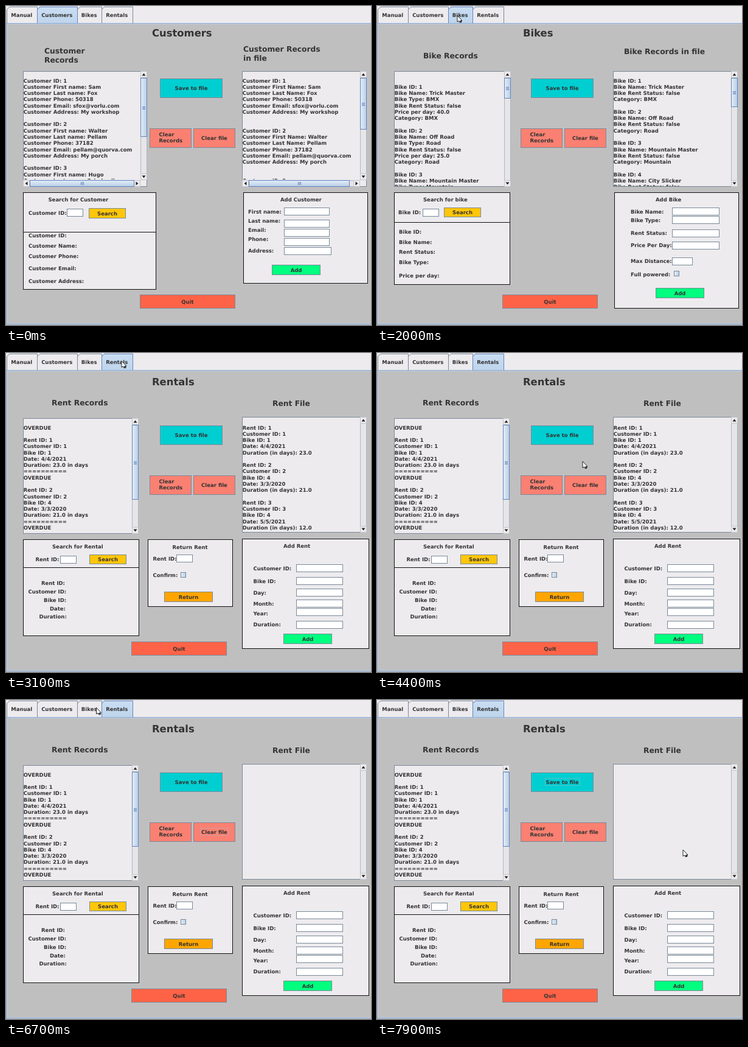
Recreate the animation shown at these times as an HTML page. Size 600 by 524 pixels, loop 8 s.

```html
<!DOCTYPE html>
<html lang="en">
<head>
<meta charset="utf-8">
<title>Bike rental manager</title>
<style>
html, body { margin: 0; width: 100%; height: 100%; overflow: hidden; background: #c0bfc0; }
#stage { display: block; }
text { font: bold 8.5px "DejaVu Sans", sans-serif; fill: #333; white-space: pre; text-rendering: geometricPrecision; }
.title { font-size: 16.4px; }
.head { font-size: 12.3px; }
.mid { text-anchor: middle; }
</style>
</head>
<body>
<svg id="stage" width="600" height="524" viewBox="0 0 600 524"></svg>
<script>
const PANEL = '#edebee', EDGE = '#7a8a99', BLUE = '#6382bf';

// All boxes are given by their left, top, right and bottom edges.
const box = (l, t, r, b, fill, stroke = EDGE) =>
  `<rect x="${l + .5}" y="${t + .5}" width="${r - l - 1}" height="${b - t - 1}" fill="${fill}" stroke="${stroke}"/>`;
const path = (d, fill, stroke = 'none') => `<path d="${d}" fill="${fill}" stroke="${stroke}"/>`;
const text = (s, x, y, cls = '') => `<text x="${x}" y="${y}" class="${cls}">${s}</text>`;
const title = s => text(s, 240, s === 'Rentals' ? 53 : 50, 'title');
const head = (s, x, y) => text(s, x, y, 'head');
const field = (l, t, r, b = t + 13) => box(l, t, r, b, '#fff');
const check = (l, t) => box(l, t, l + 9, t + 9, 'url(#thumb)');
const panel = (l, t, r, b, split) =>
  box(l, t, r, b, PANEL, '#111') + (split ? path(`M${l} ${split + .5}H${r}`, 'none', '#111') : '');
const labels = (x, list) => list.map(([s, y]) => text(s, x, y)).join('');

function button(s, l, t, r, b, fill) {
  return box(l, t, r, b, fill) + text(s, (l + r) / 2, (t + b) / 2 + 3.2, 'mid');
}

function arrow(l, t, dir) {
  const shape = {
    up: 'M-3 2L0 -2L3 2Z', down: 'M-3 -2L0 2L3 -2Z',
    left: 'M2 -3L-2 0L2 3Z', right: 'M-2 -3L2 0L-2 3Z'
  }[dir];
  return box(l, t, l + 11, t + 11, PANEL, '#c3c6ca') +
    `<g transform="translate(${l + 5.5} ${t + 5.5})">${path(shape, '#222')}</g>`;
}

function scrollY(l, t, b, end) {
  let s = box(l, t, l + 11, b, '#e6e5e8', '#b0b6bd') + arrow(l, t, 'up') + arrow(l, b - 11, 'down');
  if (end) {
    const m = Math.round((t + 11 + end) / 2);
    s += box(l, t + 11, l + 11, end, 'url(#thumb)', BLUE) +
      path(`M${l + 3} ${m - 1.5}h5m-5 2h5m-5 2h5`, 'none', BLUE);
  }
  return s;
}

function scrollX(l, t, r, end) {
  const m = Math.round((l + 11 + end) / 2);
  return box(l, t, r, t + 11, '#e6e5e8', '#b0b6bd') + arrow(l, t, 'left') + arrow(r - 11, t, 'right') +
    box(l + 11, t, end, t + 11, 'url(#thumbX)', BLUE) +
    path(`M${m - 1.5} ${t + 3}v5m2 -5v5m2 -5v5`, 'none', BLUE);
}

// Text area with scroll bars; thumbs end at endY and endX.
function area(l, t, r, b, lines, endY, endX, id = '') {
  const low = endX ? b - 11 : b;
  const rows = lines.map((s, i) => text(s, .7, 115.3 + 10.27 * i - t)).join('');
  return box(l, t, r, b, PANEL) +
    `<svg ${id && `id="${id}"`} x="${l}" y="${t}" width="${r - l - 11}" height="${low - t - 1}">${rows}</svg>` +
    scrollY(r - 11, t, low, endY) + (endX ? scrollX(l, b - 11, r - 11, endX) : '');
}

const actions = quitX =>
  button('Save to file', 253, 119, 356, 151, '#00ced1') +
  box(236, 201, 305, 233, '#fa8072') + text('Clear', 251.5, 214) + text('Records', 251.5, 224.3) +
  button('Clear file', 308, 201, 377, 233, '#fa8072') +
  button('Quit', quitX, 474, quitX + 157, 497, '#ff6347');

const people = [
  ['Sam', 'Fox', '50318', 'sfox@vorlu.com', 'My workshop'],
  ['Walter', 'Pellam', '37182', 'pellam@quorva.com', 'My porch'],
  ['Hugo', 'Brindwell', '', '', '']
];
const personLines = (word, gap) => people.flatMap(([first, last, phone, mail, home], i) => [
  `Customer ID: ${i + 1}`, `Customer First ${word}: ${first}`, `Customer Last ${word}: ${last}`,
  `Customer Phone: ${phone}`, `Customer Email: ${mail}`, `Customer Address: ${home}`, ...gap]);

const bikes = [
  ['Trick Master', 'BMX', '40.0'], ['Off Road', 'Road', '25.0'],
  ['Mountain Master', 'Mountain', '30.0'], ['City Slicker', 'City', '20.0']
];
const bikeLines = full => bikes.flatMap(([name, type, price], i) => [
  `Bike ID: ${i + 1}`, `Bike Name: ${name}`, ...(full ? [`Bike Type: ${type}`] : []),
  'Bike Rent Status: false', ...(full ? [`Price per day: ${price}`] : []), `Category: ${type}`, '']);

const rents = [[1, '4/4/2021', '23.0'], [4, '3/3/2020', '21.0'], [4, '5/5/2021', '12.0']];
const rentHead = ([bike, date], i) =>
  [`Rent ID: ${i + 1}`, `Customer ID: ${i + 1}`, `Bike ID: ${bike}`, `Date: ${date}`];
const rentLines = rents.flatMap((r, i) =>
  ['OVERDUE', '', ...rentHead(r, i), `Duration: ${r[2]} in days`, '==========']);
const rentFile = rents.flatMap((r, i) => [...rentHead(r, i), `Duration (in days): ${r[2]}`, '']);

const GOLD = '#ffc60a', GREEN = '#00ff7f';

const customersPage = title('Customers') +
  head('Customer', 63, 78) + head('Records', 63, 93) +
  head('Customer Records', 390, 74.5) + head('in file', 390, 89.5) +
  area(28, 107, 232, 297, ['', ...personLines('name', [''])], 215, 211) +
  area(388, 107, 593, 297, ['', ...personLines('Name', ['', ''])], 203, 565) +
  actions(220) +
  panel(28, 306, 247, 466, 371) + text('Search for Customer', 69.5, 320.5) +
  text('Customer ID:', 37, 343) + field(100, 333, 127) + button('Search', 136, 332, 197, 349, GOLD) +
  labels(37, [['Customer ID:', 379.5], ['Customer Name:', 396.5], ['Customer Phone:', 413.5],
    ['Customer Email:', 434], ['Customer Address:', 454.5]]) +
  panel(390, 306, 595, 456) + text('Add Customer', 451, 320.5) +
  labels(398, [['First name:', 340.5], ['Last name:', 355.5], ['Email:', 370.5],
    ['Phone:', 385.5], ['Address:', 404.5]]) +
  [331, 351, 366, 381].map(y => field(457, y, 532)).join('') + field(457, 396, 535) +
  button('Add', 437, 425, 517, 442, GREEN);

const bikesPage = title('Bikes') +
  head('Bike Records', 76, 85.5) + head('Bike Records in file', 406, 78.5) +
  area(28, 107, 220, 297, ['', '', ...bikeLines(true)], 152) +
  area(388, 107, 593, 297, ['', ...bikeLines(false)], 166) +
  actions(206) +
  panel(28, 306, 219, 458, 355) + text('Search for bike', 76, 320.5) +
  text('Bike ID:', 35, 342) + field(75, 333, 102) + button('Search', 110, 331, 171, 347, GOLD) +
  labels(36, [['Bike ID:', 374], ['Bike Name:', 390.5], ['Rent Status:', 407],
    ['Bike Type:', 424], ['Price per day:', 445.5]]) +
  panel(390, 306, 595, 497) + text('Add Bike', 458, 320.5) +
  labels(417, [['Bike Name:', 340.5], ['Bike Type:', 355], ['Rent Status:', 375.5],
    ['Price Per Day:', 396], ['Max Distance:', 421.5], ['Full powered:', 443.5]]) +
  [331, 345, 367, 387].map(y => field(485, y, 563)).join('') + field(485, 413, 519) + check(488, 435) +
  button('Add', 458, 463, 538, 480, GREEN);

const rentalsPage = title('Rentals') +
  head('Rent Records', 75, 85.5) + head('Rent File', 438, 87) +
  area(28, 107, 218, 297, ['', ...rentLines], 241) +
  area(388, 105, 593, 295, ['', ...rentFile], 0, 0, 'rentFile') +
  actions(206) +
  panel(28, 306, 219, 465, 352) + text('Search for Rental', 76, 320.5) +
  text('Rent ID:', 48.5, 342) + field(89, 333, 116) + button('Search', 137, 331, 198, 347, GOLD) +
  text('Rent ID:', 58, 380.5) + text('Customer ID:', 36.5, 395) + text('Bike ID:', 62, 409) +
  text('Date:', 72, 422.5) + text('Duration:', 54.5, 436) +
  panel(233, 306, 373, 417) + text('Return Rent', 273.5, 321.5) +
  text('Rent ID:', 241.5, 340.5) + field(280, 331, 307) +
  text('Confirm:', 241.5, 368) + check(287, 360) +
  button('Return', 260, 392, 340, 409, '#ffa500') +
  panel(388, 305, 597, 486) + text('Add Rent', 456, 319.5) +
  labels(406.5, [['Customer ID:', 357], ['Bike ID:', 378], ['Day:', 396.5],
    ['Month:', 415], ['Year:', 430.5], ['Duration:', 449]]) +
  [347, 368, 387, 405, 419, 440].map(y => field(477, y, 554)).join('') +
  button('Add', 456, 461, 536, 478, GREEN);

const tabs = [['Manual', 1, 51], ['Customers', 51, 117], ['Bikes', 117, 157], ['Rentals', 157, 208]];
const tab = ([s, l, r], fill, edge) =>
  path(`M${l + .5} 28V5.5L${l + 5} 1.5H${r + .5}V28`, fill, edge) + text(s, (l + r) / 2 - .3, 18, 'mid');

const pages = [['Customers', customersPage], ['Bikes', bikesPage], ['Rentals', rentalsPage]];
const gradient = (id, x, y, from, to) =>
  `<linearGradient id="${id}" x2="${x}" y2="${y}"><stop stop-color="${from}"/><stop offset="1" stop-color="${to}"/></linearGradient>`;
const ring = (id, l, t, r, b) => `<g id="${id}" opacity=".5">${box(l, t, r, b, 'none', '#a3b8cc')}</g>`;

document.getElementById('stage').innerHTML =
  '<defs>' + gradient('thumb', 1, 0, '#e4eef8', '#b8cfe5') + gradient('thumbX', 0, 1, '#e4eef8', '#b8cfe5') +
  gradient('tab', 0, 1, '#c8ddf2', '#bfd5ec') + '</defs>' +
  path('M0 0H600V28H0Z', PANEL) + path('M0 28H600V524H0Z', '#c0bfc0') +
  tabs.map(t => tab(t, PANEL, EDGE)).join('') +
  path('M0 28H600V30H2V521H600V523H0Z', '#b8cfe5') + path('M0.5 523V28.5H600M0 522.5H600', 'none', '#8fa9cc') +
  pages.map(([name, body], i) =>
    `<g id="${name}">${tab(tabs[i + 1], 'url(#tab)', BLUE)}${body}</g>`).join('') +
  ring('clearRing', 319, 210, 366, 223) + ring('saveRing', 276, 128, 334, 141) +
  `<g id="cursor">${path('M0 0V10.5L2.5 9L4 11.5H6.5L7.5 8Z', '#fff', '#222')}${path('M3.5 9L7 7.5V11H4.5Z', '#2b3b3b')}</g>`;

// Pointer stops: time, x, y
const stops = [
  [300, 130, 526], [1000, 152, 95], [1200, 157, 72], [1400, 157, 72], [1800, 132, 15.5], [2500, 132, 15.5],
  [2800, 190, 13], [3400, 190, 13], [4200, 338, 178], [4700, 338, 178], [5300, 342, 216],
  [5900, 342, 216], [6700, 148.5, 12.5], [6800, 138, 14], [7100, 138, 14], [7300, 185, 14],
  [7500, 185, 14], [7850, 503, 246], [8000, 503, 246]
];

function pointer(t) {
  const i = stops.findIndex(s => s[0] > t);
  const [t0, x0, y0] = stops[i - 1], [t1, x1, y1] = stops[i];
  const p = (t - t0) / (t1 - t0), e = p * p * (3 - 2 * p);
  return `translate(${x0 + (x1 - x0) * e} ${y0 + (y1 - y0) * e})`;
}

const show = (id, on) => document.getElementById(id).setAttribute('display', on ? 'inline' : 'none');

function draw(now) {
  const t = Math.floor(now % 8000 / 100) * 100;
  const page = t < 1900 ? 'Customers' : t < 2800 || t >= 6800 && t < 7400 ? 'Bikes' : 'Rentals';
  pages.forEach(([name]) => show(name, name === page));
  show('rentFile', t < 5500);
  show('clearRing', t >= 5500 && t < 6800);
  show('saveRing', t >= 7400);
  show('cursor', t >= 300);
  if (t >= 300) document.getElementById('cursor').setAttribute('transform', pointer(t));
}

const start = performance.now();
function loop() {
  draw(performance.now() - start);
  requestAnimationFrame(loop);
}
loop();
</script>
</body>
</html>
```
